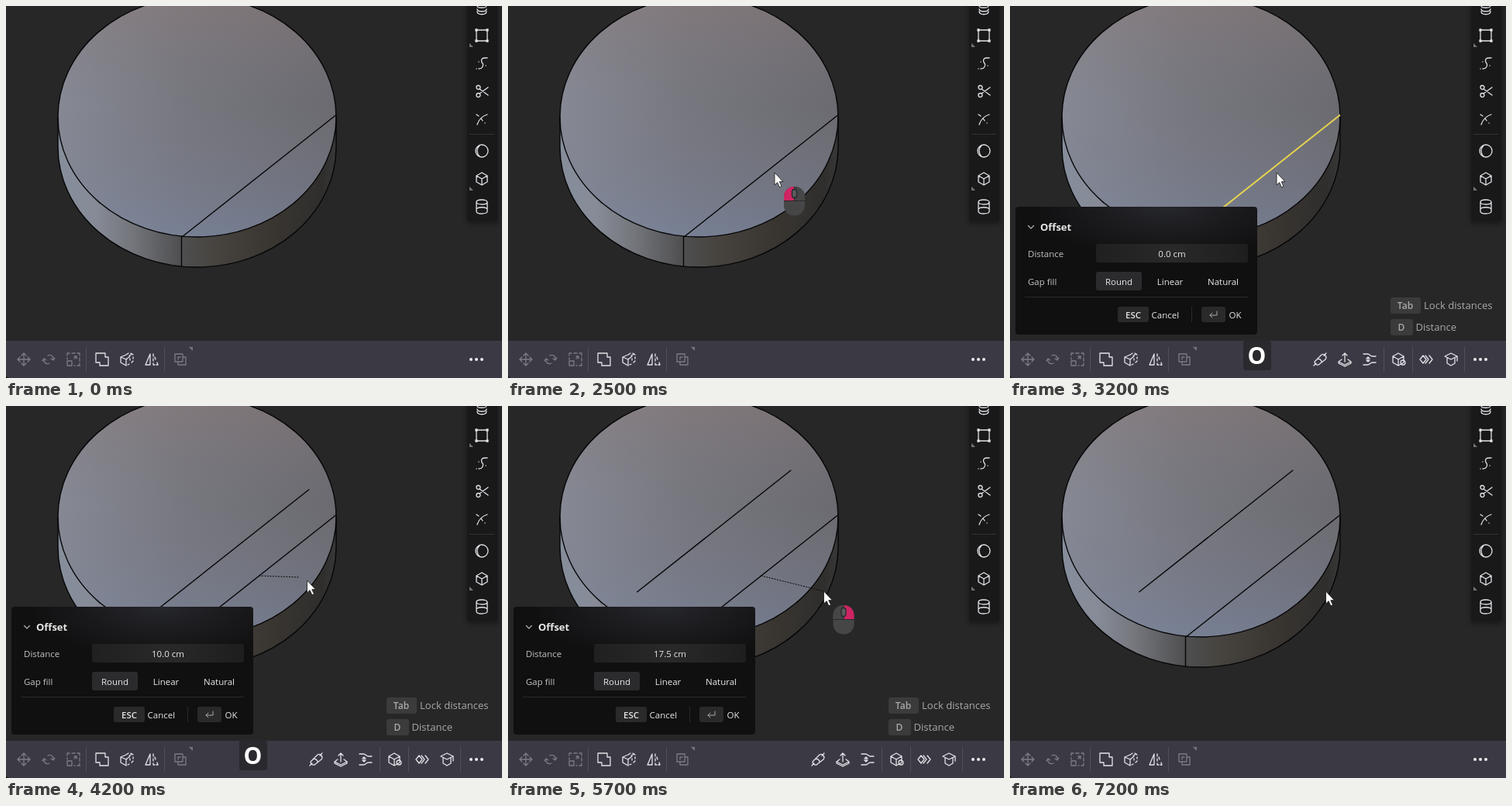
Write an HTML page that moves like this. It is 640 px wide and 480 px high and loops after 8000 ms.

```html
<!DOCTYPE html>
<html lang="en">
<head>
<meta charset="utf-8">
<title>Offset edge</title>
<style>
html, body { margin: 0; width: 100%; height: 100%; overflow: hidden; background: #272728; }
svg { display: block; width: 640px; height: 480px; font: 11.5px "Open Sans", "Noto Sans", sans-serif; }
.edge { fill: none; stroke: #060607; stroke-width: 1.4; }
.icon { fill: none; stroke: #e4e3e8; stroke-width: 1.3; stroke-linecap: round; stroke-linejoin: round; }
.dim { stroke: #7d7b83; }
.mid { text-anchor: middle; }
.sep { stroke: #514f59; }
.panel { fill: #e8e8e8; }
.label { fill: #c2c2c2; }
.key { font-weight: 600; text-anchor: middle; }
.hint { font-size: 13.1px; fill: #a9a9a9; }
</style>
</head>
<body>
<svg viewBox="0 0 640 480">
  <defs>
    <linearGradient id="across"><stop stop-color="#878b96"/><stop offset=".45" stop-color="#76777f"/><stop offset="1" stop-color="#69696f"/></linearGradient>
    <linearGradient id="down" x2="0" y2="1">
      <stop stop-color="#8e7a76" stop-opacity=".5"/><stop offset=".45" stop-color="#7c7880" stop-opacity=".1"/>
      <stop offset="1" stop-color="#7888a8" stop-opacity=".5"/>
    </linearGradient>
    <linearGradient id="wall">
      <stop stop-color="#868e9b"/><stop offset=".13" stop-color="#868b97"/><stop offset=".26" stop-color="#75777d"/>
      <stop offset=".44" stop-color="#4f4f51"/><stop offset=".55" stop-color="#484541"/>
      <stop offset=".75" stop-color="#3a3631"/><stop offset=".95" stop-color="#2f2e2d"/><stop offset="1" stop-color="#393838"/>
    </linearGradient>
    <linearGradient id="field"><stop stop-color="#202021"/><stop offset=".5" stop-color="#29292a"/><stop offset="1" stop-color="#1e1e1f"/></linearGradient>
    <radialGradient id="glow" cx=".62" cy="0" r=".55" gradientTransform="matrix(1 0 0 .75 0 0)">
      <stop stop-color="#26272c"/><stop offset=".5" stop-color="#1b1b1e"/><stop offset="1" stop-color="#101011"/>
    </radialGradient>
    <filter id="soft" x="-30%" width="160%"><feGaussianBlur stdDeviation="3"/></filter>
  </defs>
  <rect width="640" height="480" fill="#272728"/>

  <path d="M67 143V182A179.5 155 0 0 0 426 182V143Z" fill="url(#wall)"/>
  <ellipse cx="246.5" cy="143" rx="179.5" ry="155" fill="url(#across)"/>
  <ellipse class="edge" cx="246.5" cy="143" rx="179.5" ry="155" style="fill:url(#down)"/>
  <path class="edge" d="M67 143V182A179.5 155 0 0 0 426 182V143M226.5 297V336"/>
  <path id="base" class="edge" d="M426 140.5L227 298"/>
  <path id="copy" class="edge" d="M426 140.5L227 298"/>
  <path id="guide" class="edge" style="stroke-width:1;stroke-dasharray:2 1.5"/>

  <rect x="594" y="-9" width="41" height="290" rx="5" opacity=".35" filter="url(#soft)"/>
  <rect x="595" y="-9" width="39" height="287" rx="4" fill="#19191a"/>
  <path d="M598 165.5H630" stroke="#333"/>
  <path d="M598 48V53H603ZM598 233V238H603Z" fill="#77777a"/>
  <g id="side"></g>

  <rect y="470" width="640" height="10" fill="#151517"/>
  <path d="M0 432H640V480H5Q0 480 0 475Z" fill="#3b3943"/>
  <path class="sep" d="M103.5 440V472M204.5 440V472"/>
  <path d="M236 440H241V445Z" fill="#77757d"/>
  <g id="bar"></g>
  <g fill="#ebebee"><circle cx="600" cy="456" r="2"/><circle cx="607" cy="456" r="2"/><circle cx="614" cy="456" r="2"/></g>

  <g id="command">
    <path class="sep" d="M482.5 440V472M519.5 440V472M586.5 440V472"/>
    <g id="tools"></g>
    <g class="hint">
      <rect x="491" y="376" width="39" height="21" rx="3" fill="#3b3b3c"/>
      <rect x="491" y="404" width="29" height="21" rx="3" fill="#3b3b3c"/>
      <text x="510" y="391" class="key" font-size="12">Tab</text><text x="534" y="391">Lock distances</text>
      <text x="505" y="419" class="key" font-size="12">D</text><text x="523.5" y="419">Distance</text>
    </g>
    <g class="panel">
      <rect x="7" y="259" width="312" height="165" rx="4" fill="url(#glow)"/>
      <path class="icon" d="M23.500 283.500L27 287L30.500 283.500" style="stroke:#aaa"/>
      <text x="39" y="290" font-size="13" font-weight="700">Offset</text>
      <text x="23" y="324" class="label">Distance</text>
      <rect x="111" y="307" width="196" height="24" rx="3" fill="url(#field)"/>
      <text id="amount" x="209" y="324" class="mid"></text>
      <text x="23" y="360" class="label">Gap fill</text>
      <rect x="111" y="343" width="59" height="24" rx="3" fill="#2b2b2d"/>
      <g class="mid"><text x="140.500" y="360">Round</text><text x="206.500" y="360">Linear</text><text x="275" y="360">Natural</text></g>
      <path d="M19 375.500H307M234.500 388V408" stroke="#29292a"/>
      <rect x="139" y="388" width="40" height="20" rx="3" fill="#2a2a2b"/>
      <text x="159" y="402.500" class="key">ESC</text><text x="182.500" y="402.500">Cancel</text>
      <rect x="247" y="388" width="31" height="20" rx="3" fill="#2a2a2b"/>
      <path class="icon" d="M267 394V399H258M261 396L258 399L261 402" style="stroke:#aaa;stroke-width:1"/>
      <text x="282.500" y="402.500">OK</text>
    </g>
  </g>
  <g id="letter">
    <rect x="301" y="432" width="36" height="38" rx="3" fill="#2a292e"/>
    <text x="318.500" y="461.500" class="mid" font-size="30" font-weight="700" fill="#fff">O</text>
  </g>
  <g id="pointer">
    <g id="mouse">
      <rect x="12" y="18" width="27" height="37.500" rx="13" fill="#464647"/>
      <path id="left" d="M25 18V36H12V31A13 13 0 0 1 25 18Z"/>
      <path id="right" d="M26 18V36H39V31A13 13 0 0 0 26 18Z"/>
      <path d="M12 36.500H39M25.500 18V36" stroke="#29292b"/>
      <rect x="22.500" y="21.500" width="6" height="11" rx="3" fill="#5b5b5d" stroke="#29292b" stroke-width="1.300"/>
    </g>
    <path d="M0 0V16L3.600 12.700L6.400 18.800L9 17.600L6.300 11.700H11Z" fill="#fff" stroke="#222" stroke-width=".9"/>
  </g>
</svg>
<script>
const $ = id => document.getElementById(id);
const cube = "M0-8L7-4V4L0 8L-7 4V-4ZM-7-4L0 0L7-4M0 0V8";

// Each icon: centre x, centre y, path, optional class
function icons(id, list) {
  $(id).innerHTML = list.map(([x, y, d, c = ""]) =>
    `<path class="icon ${c}" transform="translate(${x} ${y})" d="${d}"/>`).join("");
}
icons("side", [
  [614, 4, "M-6-4C-6-7 6-7 6-4S-6-1-6-4M-6 0C-6 4 6 4 6 0M-6 3C-6 8 6 8 6 3"],
  [614, 38, "M-7-7H7V7H-7ZM-8-8h2v2h-2zM6-8h2v2h-2zM-8 6h2v2h-2zM6 6h2v2h-2z"],
  [614, 74, "M6-7H4C-3-7 0-1 1 0S2 7-4 7M-7 7h.1M7-7h.1M-4-2h.1M5 3h.1"],
  [614, 110, "M-3-3L8 5M-3 3L8-5M-7-5a2.5 2.5 0 1 0 5 0a2.5 2.5 0 1 0-5 0M-7 5a2.5 2.5 0 1 0 5 0a2.5 2.5 0 1 0-5 0"],
  [614, 146, "M-6 7C-4 1 0-4 7-6M-7-6L-4-4M-1-1L1 2M4 5h.1"],
  [614, 187, "M-8 0a8 8 0 1 0 16 0a8 8 0 1 0-16 0M-3-7C-7-3-7 3-3 7"],
  [614, 223, cube],
  [614, 259, "M-7-6C-7-10 7-10 7-6S-7-2-7-6V6C-7 10 7 10 7 6V-6M-7 3C-5 0 5 0 7 3"]
]);
icons("bar", [
  [23, 456, "M-8 0H8M0-8V8M-3-5L0-8L3-5M-3 5L0 8L3 5M-5-3L-8 0L-5 3M5-3L8 0L5 3", "dim"],
  [55, 456, "M-1-5C4-7 7-3 6 1M3-1L6 1L8-2M1 5C-4 7-7 3-6-1M-3 1L-6-1L-8 2", "dim"],
  [87, 456, "M-8-5V-8H-5M-2-8H2M5-8H8V-5M8-2V2M8 5V8H5M-8-2V0M-8 2H-2V8H-8ZM1 8H2M1-1L4-4M1-4H4V-1", "dim"],
  [124, 456, "M-8-8H4V-3H8V8H-3V4H-8Z"],
  [156, 456, "M-1-6L-8-3V4L-1 8V0L-8-3M-1 0L4-4M-1-6L2-8M5-8L8-6M8-3V-1M8 2L6 4M3 6L1 7M4-1V1M3-5L7-7"],
  [188, 456, "M-2-7V7H-8ZM2-7V-4M2-1V2M2 5V7H4M6 7H8L7 4M4-3L5 0"],
  [225, 456, "M-7-7H3V3H-7ZM-3 3V7H7V-3H3M-3 0V-3H0", "dim"]
]);
icons("tools", [
  [400, 456, "M-7 3L2-6A4 4 0 0 1 7 0L-2 7A4 4 0 0 1-7 3ZM-4 0A4 4 0 0 1 2 4M-8 8L-5 5M5-5L8-8"],
  [432, 456, "M-4 0L-8 3L0 7L8 3L4 0M0 3V-8M-3-5L0-8L3-5M-8 3V5L0 9L8 5V3"],
  [464, 456, "M-8-7H-3C1-7 0-4 4-4H8M-8 7H-3C1 7 0 4 4 4H8M-2-3V3M-4-1L-2-3L0-1M-4 1L-2 3L0 1"],
  [501, 456, cube + "M3 4a3 3 0 1 0 6 0a3 3 0 1 0-6 0"],
  [537, 456, "M-8 0L-4-5L0 0L-4 5ZM-1-5L3 0L-1 5M4-5L8 0L4 5"],
  [569, 456, "M0-8L8-4L0 0L-8-4ZM-5-2V5L0 8L5 5V-2M8-4V2"]
]);

// Keys are [time, ...values]; linear between neighbours, held at both ends
function at(keys, t) {
  let i = keys.findIndex(k => k[0] > t);
  if (i === 0) return keys[0].slice(1);
  if (i < 0) return keys.at(-1).slice(1);
  const a = keys[i - 1], b = keys[i], u = (t - a[0]) / (b[0] - a[0]);
  return a.slice(1).map((v, n) => v + (b[n + 1] - v) * u);
}
const pointerPath = [
  [100, 491, 481], [700, 499, 417], [900, 499, 417], [1300, 390, 294], [1800, 344, 215],
  [3700, 344, 215], [4200, 388.5, 225], [4600, 402, 234], [5100, 407.5, 239]
];
const distance = [[3700, 0], [4200, 10], [4600, 15.2], [5100, 17.5]];
const guideEnd = [[3700, 326.5, 219], [4200, 378, 221], [4600, 398, 232], [5100, 408, 239]];

const show = (id, on) => $(id).style.display = on ? "" : "none";

function draw(t) {
  const within = (a, b) => t >= a && t < b;
  const [x, y] = at(pointerPath, t), [cm] = at(distance, t);
  $("pointer").setAttribute("transform", `translate(${x} ${y})`);
  show("pointer", t >= 200);
  show("mouse", within(2500, 2600) || within(5700, 5900));
  $("left").style.fill = t < 3000 ? "#cf2463" : "#464647";
  $("right").style.fill = t < 3000 ? "#464647" : "#cf2463";

  show("command", within(2600, 7000));
  show("letter", within(3100, 4600));
  $("amount").textContent = cm.toFixed(1) + " cm";

  const picked = within(2600, 3800);
  $("base").style.stroke = picked ? "#e5d34f" : "";
  $("base").style.strokeWidth = picked ? 2 : "";
  show("copy", t >= 3800);
  $("copy").setAttribute("transform", `translate(${-3.47 * cm} ${-3.3 * cm})`);
  show("guide", within(3800, 7000));
  $("guide").setAttribute("d", "M326.5 219L" + at(guideEnd, t).join(" "));
}

function frame() {
  draw(Math.floor(performance.now() % 8000 / 100) * 100);
  requestAnimationFrame(frame);
}
frame();
</script>
</body>
</html>
```
